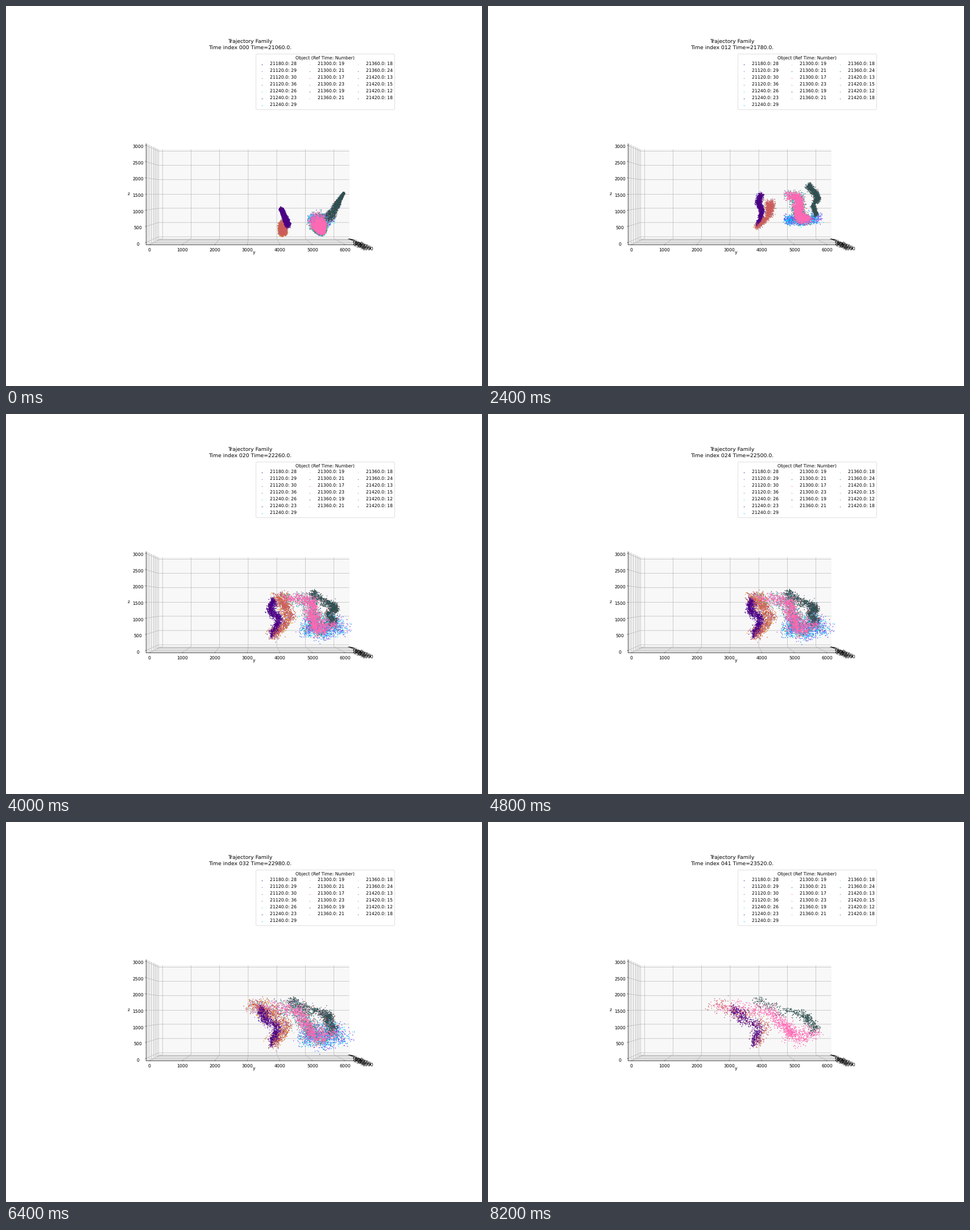
A matplotlib script for the animation above (8.4 s loop, 837 by 669 pixels).

```python
import numpy as np
import matplotlib.pyplot as plt
from matplotlib.animation import FuncAnimation

W, H, DPI = 837, 669, 55.8
FRAMES, STEP_MS = 42, 200
RISEN, CURLED = 8, 16
STRANDS = 60

plt.rcParams["text.hinting"] = "none"
rng = np.random.default_rng(7)


def ramp(t, start, stop):
    return float(np.clip((t - start) / (stop - start), 0, 1))


class Plume:
    """Particles that start in a blob, rise as a plume, curl over and shear left.

    start and rise hold a head and a foot (x, y, radius) in stage pixels;
    curl is the later centre line, whose head then drifts by `drift` per step.
    """

    def __init__(self, start, rise, curl, width, drift, count, color,
                 extras=0, palette=()):
        self.start, self.rise = np.array(start, float), np.array(rise, float)
        self.curl = np.array(curl, float)
        self.width, self.drift = width, drift
        n = count + extras
        self.extra = np.arange(n) < extras
        self.colors = np.r_[rng.choice(palette, extras) if extras else [], [color] * count]

        # Neighbouring particles share a strand, which makes the late cloud clumpy.
        strand = rng.integers(0, STRANDS, n)
        s = rng.uniform(0, 1, STRANDS)[strand] + 0.04 * rng.normal(size=n)
        self.s = 1 - np.abs(1 - np.abs(s))
        spread = np.where(self.extra, 1.25, 1.0)[:, None]
        radius, angle = np.sqrt(rng.uniform(size=n)), rng.uniform(0, 2 * np.pi, n)
        self.disk = spread * np.c_[radius * np.cos(angle), radius * np.sin(angle)]
        self.cloud = spread * (0.5 * rng.normal(size=(STRANDS, 2))[strand]
                               + 0.35 * rng.normal(size=(n, 2)))
        self.rank, self.depth = rng.uniform(size=(2, n))

    def centre(self, t):
        s = self.s[:, None]
        rise = self.rise[0] + (self.rise[1] - self.rise[0]) * s**1.5
        if t < RISEN:
            start = self.start[0] + (self.start[1] - self.start[0]) * s
            return start + (rise - start) * t / RISEN
        along = np.linspace(0, 1, len(self.curl))
        x, y = (np.interp(self.s, along, c) for c in self.curl.T)
        late = max(t - CURLED, 0)
        x = x - self.drift * late * (1 - self.s)**2
        r = np.full_like(x, self.width * (1 + late / 60))
        return rise + (np.c_[x, y, r] - rise) * ramp(t, RISEN, CURLED)

    def at(self, t):
        x, y, r = self.centre(t).T
        loose = ramp(t, 6, 20)
        offset = (1 - loose) * self.disk + loose * self.cloud
        main = np.interp(t, [16, 32, 41], [1, 0.65, 0.45])
        extra = np.interp(t, [32, 38, 41], [1, 0.65, 0])
        keep = self.rank < np.where(self.extra, extra, main)
        order = ~self.extra + 3 * ramp(t, 6, 26) * self.depth
        xy = np.c_[x, y] + r[:, None] * offset
        return xy[keep], self.colors[keep], order[keep]


plumes = [
    Plume(start=[(538, 376, 8), (570, 376, 9)], rise=[(524, 377, 5), (580, 376, 9)],
          curl=[(524, 374), (548, 382), (575, 377), (585, 360)],
          width=12, drift=0, count=0, color="blue", extras=1000,
          palette=["blueviolet", "#9a5cff", "dodgerblue", "deepskyblue", "cyan", "royalblue"]),
    Plume(start=[(487, 384, 8), (487, 400, 7)], rise=[(497, 373, 10), (474, 388, 3)],
          curl=[(494, 319), (498, 338), (500, 360), (468, 394)],
          width=8, drift=4.4, count=800, color="indianred", extras=650,
          palette=["darkorange", "goldenrod", "peru", "rosybrown", "mediumpurple", "sienna"]),
    Plume(start=[(548, 378, 17), (555, 397, 7)], rise=[(546, 343, 13), (550, 380, 13)],
          curl=[(508, 320), (549, 327), (543, 355), (543, 381), (575, 366)],
          width=8, drift=4.2, count=2200, color="hotpink", extras=1300,
          palette=["seagreen", "darkturquoise", "mediumpurple", "silver", "sienna", "teal"]),
    Plume(start=[(484, 357, 4), (496, 386, 6)], rise=[(483, 338, 9), (481, 382, 3)],
          curl=[(478, 327), (469, 345), (482, 364), (467, 388)],
          width=5, drift=1.9, count=1100, color="indigo", extras=200,
          palette=["navy", "mediumpurple", "blueviolet"]),
    Plume(start=[(594, 329, 2), (569, 372, 9)], rise=[(576, 318, 9), (578, 370, 3)],
          curl=[(550, 315), (574, 332), (584, 344), (564, 353), (576, 366)],
          width=5, drift=3.2, count=1050, color="darkslategray", extras=500,
          palette=["firebrick", "cadetblue", "dimgray", "slategray", "mediumpurple"]),
]

fig = plt.figure(figsize=((W + 1e-6) / DPI, (H + 1e-6) / DPI), dpi=DPI)

ax = fig.add_subplot(projection="3d")
ax.view_init(elev=0, azim=0)
ax.set_box_aspect((6400, 6400, 3000))


def padded(top):
    return -top / 48, top + top / 48


ax.set(xlim=padded(6400), ylim=padded(6400), zlim=padded(3000),
       xlabel="x", ylabel="y", zlabel="z")
title = ax.set_title("")

# Flat layer in stage pixels for the particles.
layer = fig.add_axes([0, 0, 1, 1])
layer.set(xlim=(0, W), ylim=(H, 0))
layer.axis("off")
dots = layer.scatter([], [], s=4, linewidths=0)

OBJECTS = {
    "21180.0": {28: "indigo"},
    "21120.0": {29: "#9a5cff", 30: "indianred", 36: "mediumpurple"},
    "21240.0": {26: "turquoise", 23: "#2a10b0", 29: "deepskyblue"},
    "21300.0": {19: "lightgray", 21: "seagreen", 17: "hotpink", 23: "rosybrown"},
    "21360.0": {19: "darkslategray", 21: "silver", 18: "lightsteelblue", 24: "teal"},
    "21420.0": {13: "slategray", 15: "rosybrown", 12: "cadetblue", 18: "dimgray"},
}
handles = [layer.scatter([], [], s=3, linewidths=0, color=c, label=f"{ref}: {number}")
           for ref, group in OBJECTS.items() for number, c in group.items()]
ax.legend(handles=handles, ncols=3, title="Object (Ref Time: Number)",
          loc="upper right", labelspacing=0.54)


def update(i):
    title.set_text(f"Trajectory Family\nTime index {i:03d} Time={21060 + 60 * i:.1f}.")
    spots, colors, order = map(np.concatenate, zip(*(p.at(i) for p in plumes)))
    front = np.argsort(order, kind="stable")
    dots.set_offsets(spots[front])
    dots.set_facecolor(colors[front])
    return title, dots


anim = FuncAnimation(fig, update, frames=FRAMES, interval=STEP_MS, repeat=True, repeat_delay=0)
plt.show()
```
